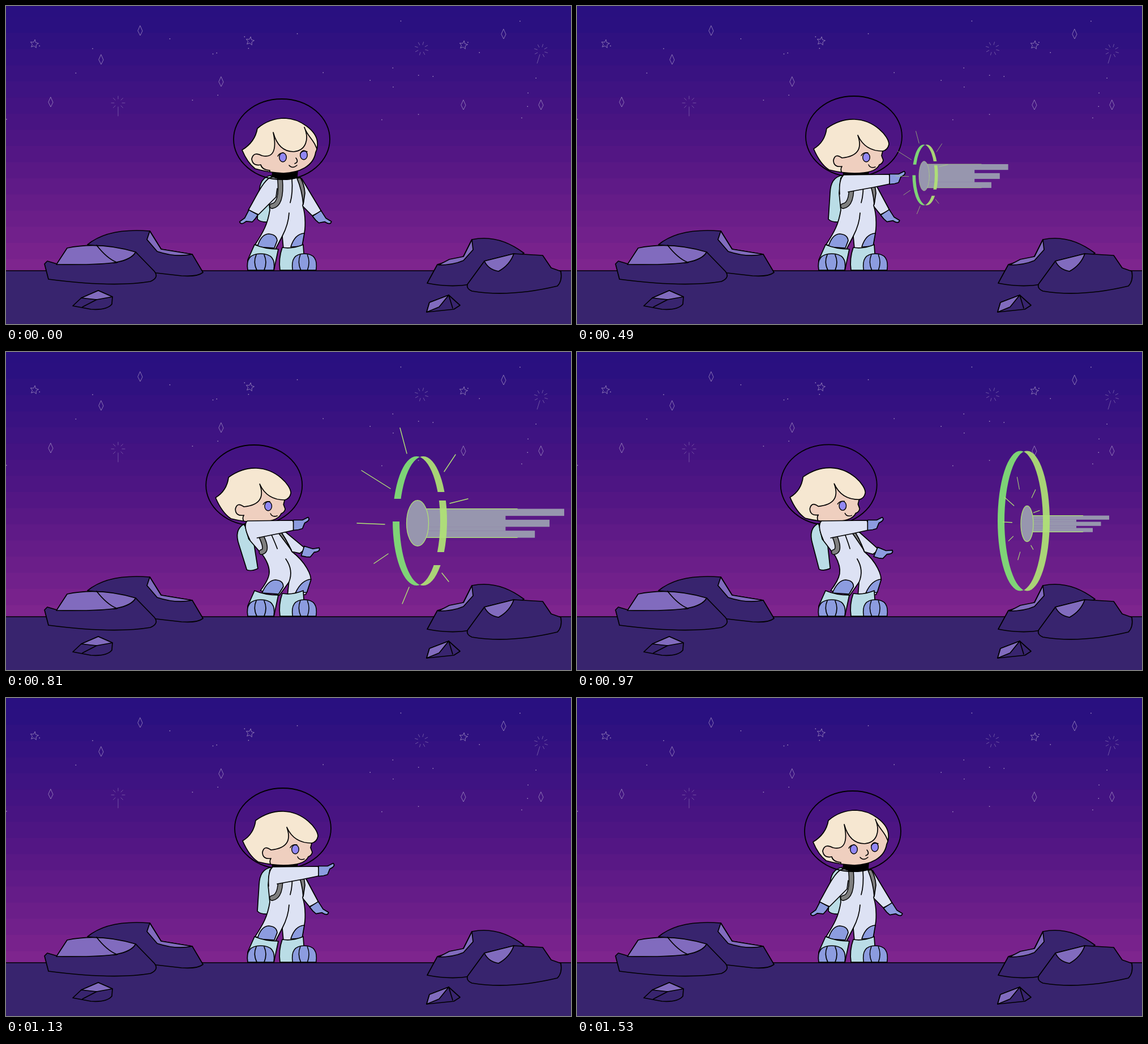
Animation of 998x561 px, one loop 1.73 s. Source, as an HTML page with a canvas:

```html
<!DOCTYPE html>
<html lang="en">
<meta charset="utf-8">
<title>Space portal</title>
<style>
html, body { margin: 0; width: 100%; height: 100%; overflow: hidden; background: #2a1080 }
canvas { display: block; width: 100vw; height: 100vh }
</style>
<canvas id="stage" width="998" height="561"></canvas>
<script>
const ctx = document.getElementById('stage').getContext('2d');
const DARK = '#38246e', LIGHT = '#816bbe', SUIT = '#dde2f4', BLUE = '#8c9cdf', CYAN = '#badde6';
const HAIR = '#f6e7d1', SKIN = '#efcfbf', IRIS = '#9187f3', GREY = '#7f7f7f', BEAM = '#9796ae';
const GREEN = '#82e276', LIME = '#b0e276', STAR = '#a08cc0';
ctx.lineCap = ctx.lineJoin = 'round';

function shape(d, fill, stroke = '#000', width = 1.7) {
  const path = new Path2D(d);
  if (fill) { ctx.fillStyle = fill; ctx.fill(path); }
  if (stroke) { ctx.strokeStyle = stroke; ctx.lineWidth = width; ctx.stroke(path); }
}
const line = (d, color, width) => shape(d, null, color, width);
function oval(x, y, rx, ry, fill, stroke = '#000', width = 1.6) {
  ctx.beginPath();
  ctx.ellipse(x, y, rx, ry, 0, 0, 7);
  if (fill) { ctx.fillStyle = fill; ctx.fill(); }
  ctx.strokeStyle = stroke; ctx.lineWidth = width; ctx.stroke();
}
function at(x, y, draw, angle = 0, sx = 1, sy = sx) {
  ctx.save();
  ctx.translate(x, y); ctx.rotate(angle); ctx.scale(sx, sy);
  draw();
  ctx.restore();
}

// ---------- scenery ----------
function sky() {
  const top = [41, 16, 128], middle = [80, 21, 131], bottom = [127, 37, 142];
  const band = 28.5;
  for (let y = -9.5; y < 467; y += band) {
    const p = Math.max(0, (y + band / 2 - 30) / 437) * 2;
    const [a, b] = p < 1 ? [top, middle] : [middle, bottom];
    ctx.fillStyle = `rgb(${a.map((v, i) => v + (b[i] - v) * (p < 1 ? p : p - 1))})`;
    ctx.fillRect(0, y, 998, band + 1);
  }
}

function stars() {
  const diamonds = [[237, 44], [168, 95], [380, 134], [79, 170], [808, 175], [945, 175], [879, 50]];
  const pentagrams = [[50, 67], [431, 62], [808, 69]];
  const bursts = [[734, 75, 12], [198, 171, 23], [945, 79, 23]];
  diamonds.forEach(([x, y]) => at(x, y, () => line('M0-9L4 0 0 8-4 0Z', STAR, .8)));
  pentagrams.forEach(([x, y]) => at(x, y, () => {
    let d = 'M';
    for (let i = 0; i < 10; i++) {
      const r = i % 2 ? 3.5 : 7.5, a = i * Math.PI / 5 - 1.4;
      d += `${r * Math.cos(a)} ${r * Math.sin(a)} `;
    }
    line(d + 'Z', STAR, .8);
  }));
  bursts.forEach(([x, y, tail]) => at(x, y, () => {
    for (let i = 0; i < 8; i++)
      at(0, 0, () => line(`M0 7V${i ? 12 : tail}`, STAR, .5), i * Math.PI / 4 + (x > 700 ? .3 : 0));
  }));
  let seed = 7;
  const random = () => (seed = seed * 16807 % 2147483647) / 2147483647;
  ctx.fillStyle = STAR;
  for (let i = 0; i < 28; i++) ctx.fillRect(random() * 998, 15 + random() * 200, 1.5, 1.5);
}

function ground() {
  ctx.fillStyle = DARK;
  ctx.fillRect(0, 467, 998, 94);
  line('M0 467H998');
  // left rocks
  shape('M144 421Q180 391 254 397L274 429 329 438 348 470Q338 478 310 476L257 470 229 434Z', DARK);
  shape('M254 397L249 412 267 433Q300 444 329 438L274 429Z', LIGHT);
  shape('M68 455L73 450 90 455 195 453 229 434 262 468Q271 479 255 486 190 497 75 482Z', DARK);
  shape('M89 456L108 427Q165 415 229 434 222 447 195 452 170 457 89 456Z', LIGHT);
  line('M160 422Q178 445 195 452');
  shape('M118 529L133 515 163 502 188 513 187 526Q178 537 150 535Z', DARK);
  shape('M133 515L163 502 188 513 160 518Z', LIGHT);
  line('M160 518L135 531');
  // right rocks
  shape('M744 489L762 456 808 442 823 412Q870 402 915 436L820 491Q785 497 744 489Z', DARK);
  shape('M764 457L783 447 808 442 823 412 825 430 808 449Q790 457 764 457Z', LIGHT);
  shape('M815 491L845 450 897 437 948 440 963 462 980 468Q983 485 974 494 890 514 823 503 813 499 815 491Z', DARK);
  shape('M845 450L897 437Q890 457 870 468 852 465 845 450Z', LIGHT);
  shape('M743 540L748 523 782 510 802 528 791 535Z', DARK);
  shape('M743 540L748 523 782 510 765 531Z', LIGHT);
  line('M782 510L789 533');
}

// ---------- character ----------
// Leaning back pulls the chest left and pushes the knees right; the feet stay.
let lean = 0;
function sway(y) {
  const s = Math.min(1, Math.max(0, (395 - y) / 95));
  const knees = Math.max(0, 1 - ((y - 400) / 45) ** 2);
  return lean * (12 * knees - 45 * s * s * (3 - 2 * s));
}
const swayed = d => d.replace(/([\d.]+) ([\d.]+)/g, (_, x, y) => `${+x + sway(+y)} ${y}`);
const part = (d, fill) => shape(swayed(d), fill);

const heads = {
  front: {
    hair: 'M444 216Q465 198 493 198C520 199 548 220 550 240Q551 250 547 258C543 283 518 294 490 295Q465 294 440 287 426 276 417 254 440 240 444 216Z',
    skin: 'M472 223C478 245 490 257 508 257 530 255 536 235 527 214 533 232 546 235 552 262V300H466V290Q452 289 450 280 436 283 434 270 437 256 452 264C468 268 480 260 472 223Z',
    lines: 'M512 268Q518 275 510 278M500 281Q506 288 514 281M480 265Q483 259 490 259M520 260Q524 254 532 257',
    eyes: [[489, 267], [526, 263]]
  },
  side: {
    hair: 'M441 216Q465 199 490 200C525 201 551 230 551 244Q549 254 540 256L538 264 541 272Q540 278 534 280C529 292 510 295 490 295Q470 295 445 289 429 278 418 252 438 240 441 216Z',
    skin: 'M496 228C505 248 520 256 540 256L550 262V300H472Q463 290 468 283 453 285 453 272 456 259 468 268 509 264 496 228Z',
    lines: 'M515 280Q518 287 527 284M502 264Q505 258 514 259',
    eyes: [[511, 267]]
  }
};

function head({ hair, skin, lines, eyes }, turn = 0) {
  shape(hair, HAIR, null);
  ctx.save();
  ctx.clip(new Path2D(hair));
  ctx.translate(turn, 0);
  shape(skin, SKIN);
  ctx.restore();
  shape(hair);
  at(turn, 0, () => {
    eyes.forEach(([x, y]) => oval(x, y, 6.3, 8, IRIS, '#000', 1.4));
    line(lines, '#000', 1.5);
  });
}

const helmet = (x, y) => oval(x, y, 85, 71, null, '#000', 1.8);

function hand(x, y, angle, flip = 1) {
  at(x + sway(y), y, () => shape('M0 -9L16 -9 26 -14Q31 -9 20 -4L16 6 9 8 0 9Z', BLUE), angle, 1, flip);
}

function boots() {
  shape('M439 421Q458 429 481 429L473 467H428L427 448Z', CYAN);
  shape('M488 426Q505 429 525 421L526 436 545 466H484Q481 446 488 426Z', CYAN);
  for (const [x, size] of [[450, 1], [527, .9]])
    at(x, 466, () => {
      shape('M-23 0Q-28-29 0-29 28-29 23 0Z', BLUE);
      line('M-8-27Q-14-14-7 0M6-27Q12-14 6 0');
    }, 0, size, 1);
}

function strap(d) {
  line(swayed(d), '#000', 10);
  line(swayed(d), GREY, 7);
}

function pack() {
  at(455 - 18 * lean, 380 + 4 * lean, () =>
    shape('M13-81Q-7-78-8-50L-11-4Q-5 2 8 1L19-50Z', CYAN), -.37 * lean);
}

const arms = {
  rest: { sleeve: 'M479 322L477 337 446 368 428 360C440 340 453 310 466 303', hand: [437, 364, 2.05, -1] },
  bend: { sleeve: 'M464 333L494 330 497 348 470 357Q450 361 449 350 450 303 466 303L478 303', hand: [495, 339, 0] },
  point: { sleeve: 'M479 328L523 320 552 314Q555 303 551 297L471 298Q462 306 464 332', hand: [552, 305.5, 0] }
};

function body(pose) {
  const [wx, wy] = pose === 'rest' ? [549, 366] : [544, 364 - 13 * lean];
  part(`M522 304L${wx + 8} ${wy - 4} ${wx - 8} ${wy + 4} 523 352Z`, SUIT);
  hand(wx, wy, 1 - .7 * lean);
  part('M466 303Q492 296 520 303 530 330 524 352C530 370 529 395 526 404L522 428 490 428 488 406 476 429 440 421C455 398 462 385 466 360L463 330Z', SUIT);
  part('M505 304Q507 330 502 347M500 365Q499 385 488 406');
  part('M444 425Q450 403 464 402 478 403 479 414L474 427Z', BLUE);
  part('M503 425Q510 402 527 401L523 424Z', BLUE);
  strap('M484 305Q488 350 470 353');
  part('M514 304Q523 325 525 350L528 330Q527 315 520 303Z', GREY);
  part(arms[pose].sleeve, SUIT);
  hand(...arms[pose].hand);
}

const neck = () => part('M471 291L515 291 514 303Q492 310 470 301Z', '#000');

function facing(pose, turned) {
  lean = 0;
  pack();
  body(pose);
  boots();
  neck();
  at(turned ? -2 : 0, 0, () => head(heads.front, turned ? 5 : 0));
  helmet(turned ? 486 : 487, 235);
}

function pointing(amount) {
  lean = amount;
  helmet(489 - 51 * lean, 230 + 5 * lean);
  pack();
  neck();
  at(-48 * lean, 5 * lean, () => head(heads.side));
  body('point');
  boots();
}

// ---------- portal, drawn around its own centre ----------
function beam(x, height, length, rx) {
  const top = -height / 2;
  ctx.fillStyle = BEAM;
  for (let i = 0, y = top; i < 5; i++) {
    const thick = height * (i % 2 ? .14 : .24);
    ctx.fillRect(x, y, length * (i % 2 ? .6 : 1 - .05 * i), thick + .3);
    y += thick;
  }
  const end = x + length * .68;
  line(`M${x} ${top}H${end}M${x} ${-top}H${end}`, LIME, 1.2);
  oval(x, 0, rx, height * .4 + 20, BEAM, LIME, 1.3);
}

// Two offset ellipses leave a crescent on each side, with optional gaps.
function ring(rx, ry, gaps) {
  for (const [from, color, cuts] of [[-60, GREEN, gaps.slice(0, 1)], [0, LIME, gaps.slice(1)]]) {
    ctx.save();
    ctx.beginPath();
    ctx.rect(from, -140, 60, 280);
    cuts.forEach(([top, bottom]) => ctx.rect(from, top, 60, bottom - top));
    ctx.clip('evenodd');
    ctx.beginPath();
    ctx.ellipse(-6, 0, rx, ry, 0, 0, 7);
    ctx.closePath();
    ctx.moveTo(6 + rx, 0);
    ctx.ellipse(6, 0, rx, ry, 0, 0, 7);
    ctx.globalAlpha = .93;
    ctx.fillStyle = color;
    ctx.fill('evenodd');
    ctx.restore();
  }
}

const RAYS = 'M-35-164L-23-119M-103-89L-52-57M-111 4L-62 6M-81 75L-56 58M-19 117L-31 146M63-117L43-87M53-31L85-39M39 92L51 107';
const GAPS = [[-39, 1], [-51, -36], [55, 78]];

function portal(p) {
  const closed = p >= 2, q = Math.max(0, p);
  at(673 + 58 * p, 298, () => {
    at(0, closed ? 5 : 4, () =>
      beam(closed ? 6 : -4, 89 * .57 ** q, 316 - 28.5 * q * (1 + q), closed ? 11 : 19.5));
    if (closed) ring(40, 123.5, []);
    else ring(42, 114, GAPS);
    at(0, 0, () => line(RAYS, LIME, closed ? 3 : 1.4), 0, closed ? .33 : 1, closed ? .47 : 1);
  }, 0, p < 0 ? .47 : 1);
}

// ---------- timeline ----------
function fire(start) {
  const since = start - 650;
  pointing(since < 0 ? 0 : 1 - (since / 480) ** 5);
  if (since < 480) portal(since / 160);
}
const cues = [
  [0, () => facing('rest')],
  [330, () => facing('bend', true)],
  ...[490, 650, 730, 810, 930, 970, 1050, 1130].map(start => [start, () => fire(start)]),
  [1330, () => facing('bend', true)],
  [1430, () => facing('rest', true)],
  [1530, () => facing('rest')]
];

function frame() {
  const t = performance.now() % 1730;
  sky();
  stars();
  ground();
  cues.findLast(([start]) => start <= t)[1]();
  requestAnimationFrame(frame);
}
frame();
</script>
</html>
```
